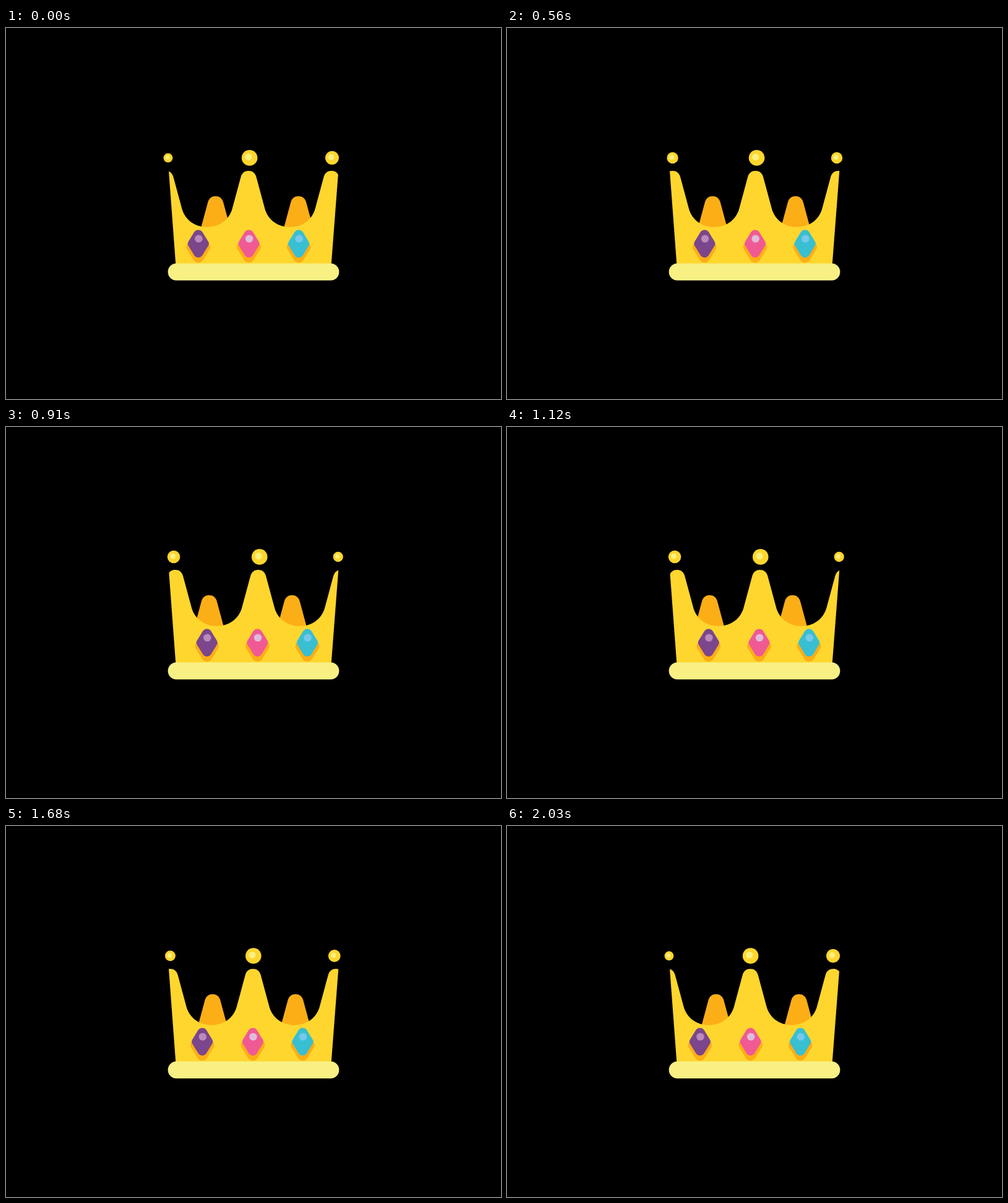
Recreate the animation shown at these times as an HTML page. Size 800 px wide and 600 px high, loop 2.1 s.

```html
<!DOCTYPE html>
<html>
<head>
<meta charset="utf-8">
<title>Crown</title>
<style>
html, body { margin: 0; width: 100%; height: 100%; overflow: hidden; background: #000; }
svg { display: block; }
</style>
</head>
<body>
<svg width="800" height="600" viewBox="0 0 800 600">
  <defs>
    <!-- one crown spike, centred on x = 0, reaching to the valleys on both sides -->
    <path id="spike" d="M-67.5 390V322H-67C-48 322-31 311-26 291L-12.5 241C-10.5 234-6 231 0 231S10.5 234 12.5 241L26 291C31 311 48 322 67 322H67.5V390Z"/>
    <path id="gem" d="M-6.5-19C-3.5-23.5 3.5-23.5 6.5-19L16-3.5Q18.2 0 16 3.5L6.5 19C3.5 23.5-3.5 23.5-6.5 19L-16 3.5Q-18.2 0-16-3.5Z"/>
    <clipPath id="body"><path d="M262.8 228L274.3 382H525.7L537.5 228Z"/></clipPath>
    <clipPath id="rear"><path d="M268 260H532V340H268Z"/></clipPath>
  </defs>
  <g clip-path="url(#rear)"><g id="back" fill="#fcae17"></g></g>
  <g clip-path="url(#body)"><g id="front" fill="#ffd62e"></g></g>
  <g id="gems"></g>
  <rect x="261.7" y="380.7" width="276.6" height="27.6" rx="13.5" fill="#f9f084"/>
  <g id="balls"></g>
</svg>
<script>
const el = id => document.getElementById(id);
const STEP = 70, HALF = 15;
const SPACING = 134;

const spikes = (from, to) => {
  let s = '';
  for (let i = from; i <= to; i++) s += `<use href="#spike" x="${i * SPACING}"/>`;
  return s;
};
el('back').innerHTML = spikes(-1, 0);
el('front').innerHTML = spikes(-2, 2);

// offset, colour, highlight
el('gems').innerHTML = [
  [0, '#7b468b', '#ba8abb'],
  [81.7, '#f05a94', '#dfbcdc'],
  [162.3, '#38bfd2', '#77c8ea']
].map(([x, color, shine]) => `<g transform="translate(${x} 348.8)">
  <use href="#gem" transform="translate(0 5.4) scale(1.13)" fill="#fcae17"/>
  <use href="#gem" fill="${color}"/>
  <circle cx=".6" cy="-7.9" r="6.2" fill="${shine}"/></g>`).join('');

// start x, x per step, start radius, radius per step
const balls = [
  [261.6, .7, 7.3, .22],
  [393, 1.24, 12.8, 0],
  [526.6, .75, 11.1, -.22]
];
el('balls').innerHTML = balls.map(() => `<g>
  <circle r="1" fill="#ffd62e"/>
  <circle cx="-.14" cy="-.1" r=".43" fill="#faf080"/></g>`).join('');

const move = (node, x, y, scale = 1) =>
  node.setAttribute('transform', `translate(${x} ${y}) scale(${scale})`);

// linear sway: 0 up to HALF and back
const sway = n => HALF - Math.abs(HALF - n % (2 * HALF));

function draw(time) {
  const n = Math.floor(time / STEP) % (2 * HALF);
  const s = sway(n), b = sway(n + .5);
  move(el('front'), 392 + 1.2 * s, 0);
  move(el('back'), 472.7 - .8 * s, 41);
  move(el('gems'), 310.8 + 1.07 * s, 0);
  balls.forEach(([x, dx, r, dr], i) =>
    move(el('balls').children[i], x + dx * b, 210, r + dr * b));
  requestAnimationFrame(draw);
}
draw(0);
</script>
</body>
</html>
```
